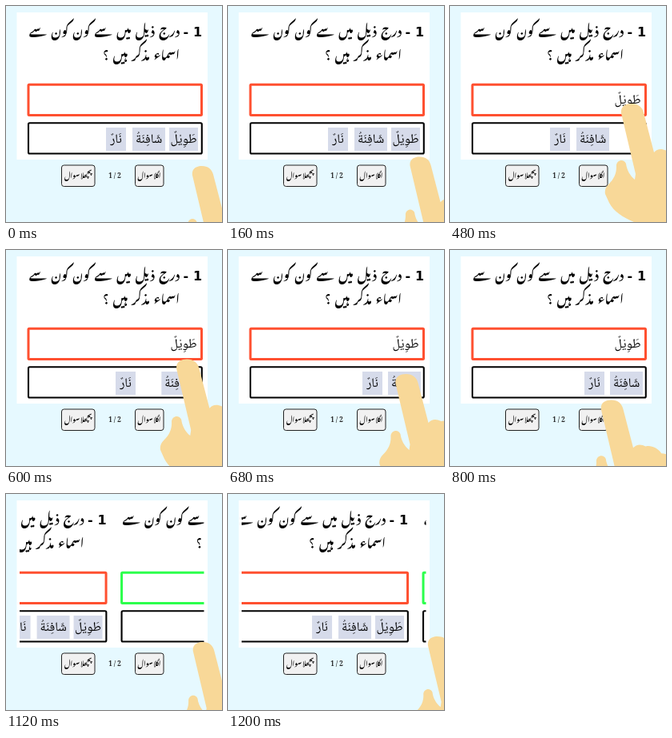
These frames come from a looping animation (270 px wide and 270 px high, 1240 ms). An HTML page:

```html
<!DOCTYPE html>
<html lang="ur">
<head>
<meta charset="utf-8">
<title>Quiz</title>
<style>
html, body { margin: 0; width: 100%; height: 100%; overflow: hidden; background: #e6f9ff; }
svg { display: block; width: 100vw; height: 100vh; }
.rtl { direction: rtl; text-anchor: start; fill: #000; }
.ask, .label { font-family: "Noto Nastaliq Urdu", "DejaVu Sans", sans-serif; }
.ask { word-spacing: 3px; }
.word { font-family: "Noto Naskh Arabic", "DejaVu Sans", sans-serif; font-weight: 500; }
.num { font: bold 16px "DejaVu Sans", sans-serif; }
.page { font: bold 8px "Noto Serif", serif; text-anchor: middle; fill: #222; }
.box { fill: #fff; stroke: #000; stroke-width: 2.1; }
.answer { stroke-width: 3; }
.btn { fill: #f1f1f1; stroke: #222; stroke-width: 1; }
.chip { fill: #d6dbea; }
</style>
</head>
<body>
<svg id="stage" viewBox="0 0 270 270"></svg>
<script>
const LOOP = 1240, PAGE = 236, SHIFT = 42;
const RED = '#ff5030', GREEN = '#2cff4c';
const question = ['درج ذیل میں سے کون کون سے', 'اسماء مذکر ہیں ؟'];
const words = [
  { text: 'طَوِيْلٌ', x: 204, w: 36 },
  { text: 'شَافِنَةُ', x: 158, w: 41 },
  { text: 'نَارٌ', x: 125, w: 25 }
];
const next = 'اگلا سوال', prev = 'پچھلا سوال';

// Pick a natural font size for the available script font.
const pen = document.createElement('canvas').getContext('2d');
function sizeFor(text, family, room, max) {
  pen.font = `40px ${family}`;
  return Math.min(max, 40 * room / pen.measureText(text).width).toFixed(2);
}
const nastaliq = '"Noto Nastaliq Urdu", "DejaVu Sans", sans-serif';
const naskh = '"Noto Naskh Arabic", "DejaVu Sans", sans-serif';
const askSize = sizeFor(question[0], nastaliq, 170, 22);
const labelSize = sizeFor(next, nastaliq, 29, 12);
const wordSize = sizeFor(words[0].text, naskh, 33, 19);

const rtl = (cls, text, x, y, size) =>
  `<text class="rtl ${cls}" x="${x}" y="${y}" font-size="${size}">${text}</text>`;

function chip({ text, x, w }) {
  const mid = x + w / 2;
  return `<g class="item"><rect class="chip" x="${x}" y="152" width="${w}" height="29"/>
    <text class="word" x="${mid}" y="171" font-size="${wordSize}"
      style="direction:rtl;text-anchor:middle">${text}</text></g>`;
}

function slide(id) {
  return `<g id="${id}">
    <text class="num" x="234" y="38">1</text><text class="num" x="221.5" y="38">-</text>
    ${rtl('ask', question[0], 217, 38, askSize)}
    ${rtl('ask', question[1], 217, 68, askSize)}
    <rect class="box answer" x="28" y="98.3" width="216.5" height="38.2" rx="1" stroke="${RED}"/>
    <rect class="box" x="28" y="146.3" width="216.8" height="38.2" rx="1.5"/>
    ${words.map(chip).reverse().join('')}
  </g>`;
}

function button(text, x, w) {
  return `<rect class="btn" x="${x}" y="199" width="${w}" height="26.5" rx="3"/>` +
    rtl('label', text, x + w - 3.5, 216, labelSize);
}

// Hand outline with the fingertip at the origin.
const handPath = `M-13 12 C-14 3 -7 0 0 0 C8 0 13 4 15 11 L28 61
  C32 56 38 56 44 59 C50 57 60 61 64 68 C74 68 82 77 84 90 L92 135 L112 190 L30 190
  L8 150 C-8 144 -22 136 -28 124 L-33 113 C-34 108 -32 104 -29 101
  C-22 94 -19 88 -19 79 C-20 71 -10 68 -7 75 C-6 83 -2 90 4 95 L5 88 Z`;

const stage = document.getElementById('stage');
stage.innerHTML = `
  <clipPath id="view"><rect x="17" y="8" width="230.5" height="184"/></clipPath>
  <rect width="270" height="270" fill="#e6f9ff"/>
  <rect x="13.5" y="8" width="238.5" height="184" fill="#fff"/>
  <g clip-path="url(#view)">${slide('now')}${slide('then')}</g>
  ${button(prev, 69.5, 41.5)}${button(next, 161.5, 35.5)}
  <text class="page" x="136" y="215">1 / 2</text>
  <path id="hand" d="${handPath}" fill="#f8d898"/>`;

const now = document.getElementById('now');
const then = document.getElementById('then');
const hand = document.getElementById('hand');
const answer = now.querySelector('.answer');
const [third, second, first] = now.querySelectorAll('.item');
const firstBack = first.querySelector('.chip');

// time, x, y, scale
const path = [
  [0, 245, 200, .93], [280, 235.5, 179, .93], [350, 233, 169, .95],
  [480, 227, 122, 1], [680, 222.5, 155, 1], [900, 187, 211, .96],
  [1000, 205, 203, .95], [1120, 246, 185, .94], [1200, 262, 178, .93], [1240, 267, 176, .93]
];

const clamp = v => Math.max(0, Math.min(1, v));
const ease = (t, a, b) => { const u = clamp((t - a) / (b - a)); return u * u * (3 - 2 * u); };
const move = (el, x, y) => el.setAttribute('transform', `translate(${x} ${y})`);

function pose(t) {
  let i = 0;
  while (i < path.length - 2 && t >= path[i + 1][0]) i++;
  const at = k => path[Math.max(0, Math.min(path.length - 1, k))];
  const a = at(i), b = at(i + 1), before = at(i - 1), after = at(i + 2);
  const span = b[0] - a[0], u = (t - a[0]) / span;
  return [1, 2, 3].map(k => {
    const m = (b[k] - before[k]) / (b[0] - before[0]) * span;
    const n = (after[k] - a[k]) / (after[0] - a[0]) * span;
    const d = b[k] - a[k];
    return a[k] + u * (m + u * (3 * d - 2 * m - n + u * (m + n - 2 * d)));
  });
}

function draw(t) {
  const p = ease(t, 998, 1244);
  move(now, PAGE * p, 0);
  move(then, PAGE * (p - 1), 0);
  move(first, 0, -49 * ease(t, 330, 475));
  firstBack.setAttribute('opacity', 1 - ease(t, 410, 475));
  move(second, SHIFT * ease(t, 500, 630), 0);
  move(third, (SHIFT + 1) * ease(t, 560, 675), 0);
  answer.style.stroke = t < 900 ? RED : GREEN;
  const [x, y, s] = pose(t);
  hand.setAttribute('transform', `translate(${x} ${y}) scale(${s})`);
}

then.querySelector('.answer').style.stroke = RED;
const start = performance.now();
function tick() {
  const t = (performance.now() - start) % LOOP;
  draw(Math.floor(t / 40) * 40);
  requestAnimationFrame(tick);
}
draw(0);
requestAnimationFrame(tick);
</script>
</body>
</html>
```
